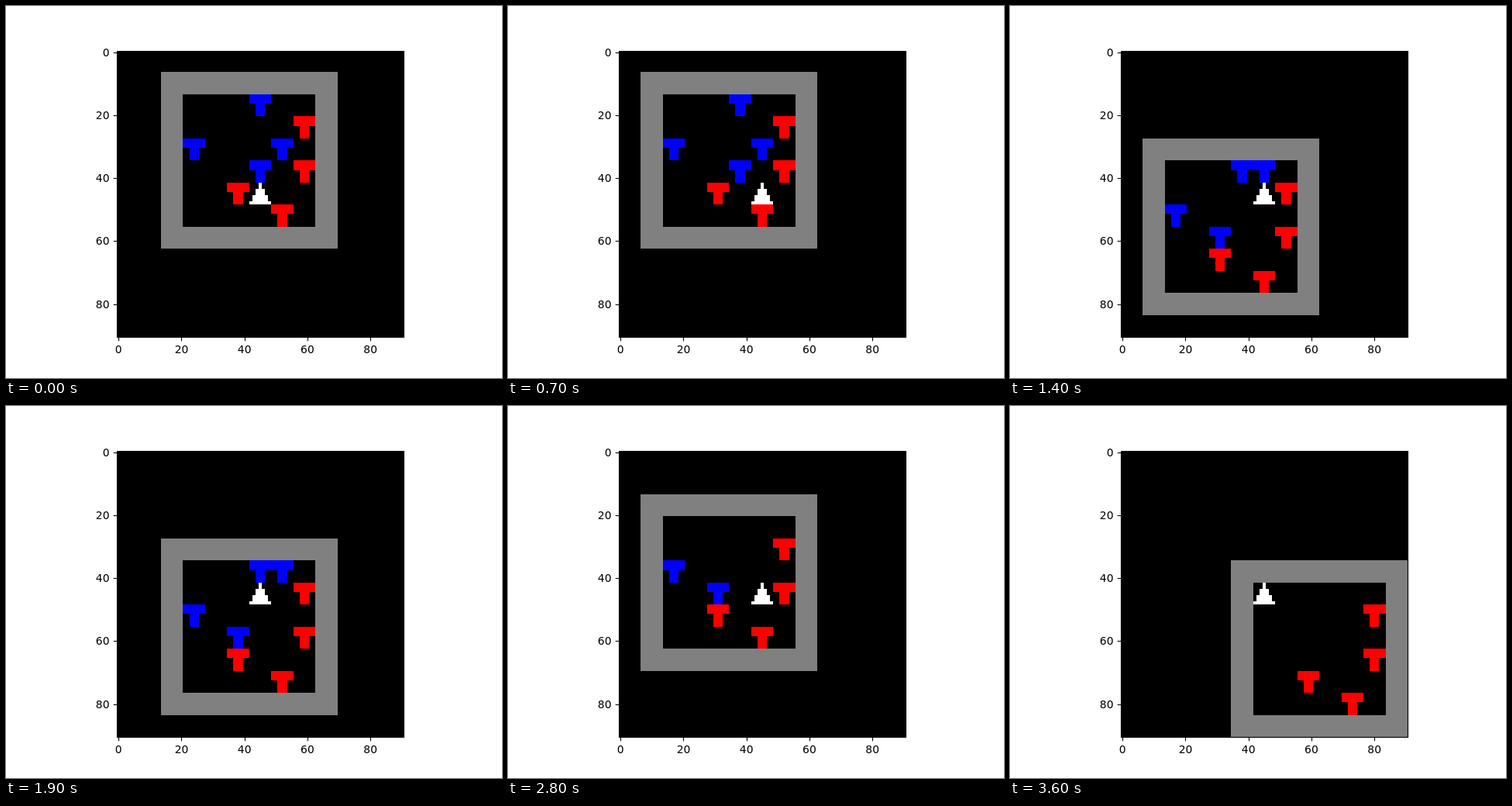
Write an HTML page with a canvas that moves like this. It is 640 by 480 pixels and loops after 3.7 s.

```html
<!DOCTYPE html>
<html lang="en">
<head>
<meta charset="utf-8">
<title>Grid world</title>
<style>
  html, body { margin: 0; width: 100%; height: 100%; overflow: hidden; background: #fff; }
  canvas { display: block; }
</style>
</head>
<body>
<canvas id="stage" width="640" height="480"></canvas>
<script>
const ctx = document.getElementById('stage').getContext('2d');

const STEP_MS = 100;
const CELL = 7;               // image pixels per grid cell
const VIEW = 91;              // image pixels per side
const ROOM = 8;               // cells per side, walls included
const CENTER = 6;             // the agent always stands in this view cell
const PX = 370 / VIEW;
const AXES = { left: 143.2, top: 57.6, bottom: 427.2, unit: 369.6 / VIEW };

const MOVES = 'RRLUDRLULRLRUULLRRLUDRULDRDDLLLL-UUU';
const DIRS = { U: [0, -1], D: [0, 1], L: [-1, 0], R: [1, 0], '-': [0, 0] };
const REDS = [[6, 2], [6, 4], [3, 5], [5, 6]];
const START = { agent: [4, 5], blues: [[4, 1], [1, 3], [5, 3], [4, 4]] };

const inRoom = ([x, y]) => x > 0 && y > 0 && x < ROOM - 1 && y < ROOM - 1;

// The agent pushes blue pieces; one pushed into a wall disappears.
function advance({ agent, blues }, move) {
  const [dx, dy] = DIRS[move];
  const next = [agent[0] + dx, agent[1] + dy];
  const pushed = blues.map(([x, y]) =>
    x === next[0] && y === next[1] ? [x + dx, y + dy] : [x, y]);
  return { agent: next, blues: pushed.filter(inRoom) };
}

const states = [START];
for (const move of MOVES) states.push(advance(states[states.length - 1], move));

// Fills a block of image pixels, snapped to whole screen pixels.
function block(x, y, w, h, color) {
  const x0 = Math.round(143 + x * PX), x1 = Math.round(143 + (x + w) * PX);
  const y0 = Math.round(57 + y * PX), y1 = Math.round(57 + (y + h) * PX);
  ctx.fillStyle = color;
  ctx.fillRect(x0, y0, x1 - x0, y1 - y0);
}

function piece(cx, cy, color) {
  const x = cx * CELL, y = cy * CELL;
  block(x, y, 7, 3, color);
  block(x + 2, y + 3, 3, 4, color);
}

function drawAgent() {
  const p = CENTER * CELL;
  for (let i = 0; i < 4; i++) block(p + 3 - i, p + 2 * i, 2 * i + 1, i < 3 ? 2 : 1, '#fff');
}

function line(x0, y0, x1, y1) {
  ctx.beginPath();
  ctx.moveTo(x0, y0);
  ctx.lineTo(x1, y1);
  ctx.stroke();
}

function drawAxes() {
  const snap = v => Math.floor(v + 0.5) + 0.5;
  ctx.strokeStyle = ctx.fillStyle = '#000';
  ctx.lineWidth = 1.11;
  ctx.strokeRect(143.5, 58.5, 370, 369);
  ctx.font = '13.889px "DejaVu Sans", sans-serif';
  for (let v = 0; v <= 80; v += 20) {
    const x = AXES.left + (v + 0.5) * AXES.unit;
    const y = AXES.top + (v + 0.5) * AXES.unit;
    line(snap(x), 427.5, snap(x), 432.36);
    line(143.5, snap(y), 138.64, snap(y));
    ctx.textAlign = 'center';
    ctx.fillText(v, x, 448);
    ctx.textAlign = 'right';
    ctx.fillText(v, 133.5, Math.round(y + 5.07));
  }
}

function draw({ agent, blues }) {
  const ox = CENTER - agent[0], oy = CENTER - agent[1];
  ctx.fillStyle = '#fff';
  ctx.fillRect(0, 0, 640, 480);
  ctx.fillStyle = '#000';
  ctx.fillRect(143, 58, 370, 369);

  ctx.save();
  ctx.beginPath();
  ctx.rect(143, 58, 370, 369);
  ctx.clip();
  block(ox * CELL, oy * CELL, ROOM * CELL, ROOM * CELL, '#808080');
  block((ox + 1) * CELL, (oy + 1) * CELL, (ROOM - 2) * CELL, (ROOM - 2) * CELL, '#000');
  for (const [x, y] of REDS) piece(x + ox, y + oy, '#f00');
  for (const [x, y] of blues) piece(x + ox, y + oy, '#00f');
  drawAgent();
  ctx.restore();

  drawAxes();
}

let startTime = null;
function tick(now) {
  if (startTime === null) startTime = now;
  draw(states[Math.floor((now - startTime) / STEP_MS) % states.length]);
  requestAnimationFrame(tick);
}
draw(START);
requestAnimationFrame(tick);
</script>
</body>
</html>
```
